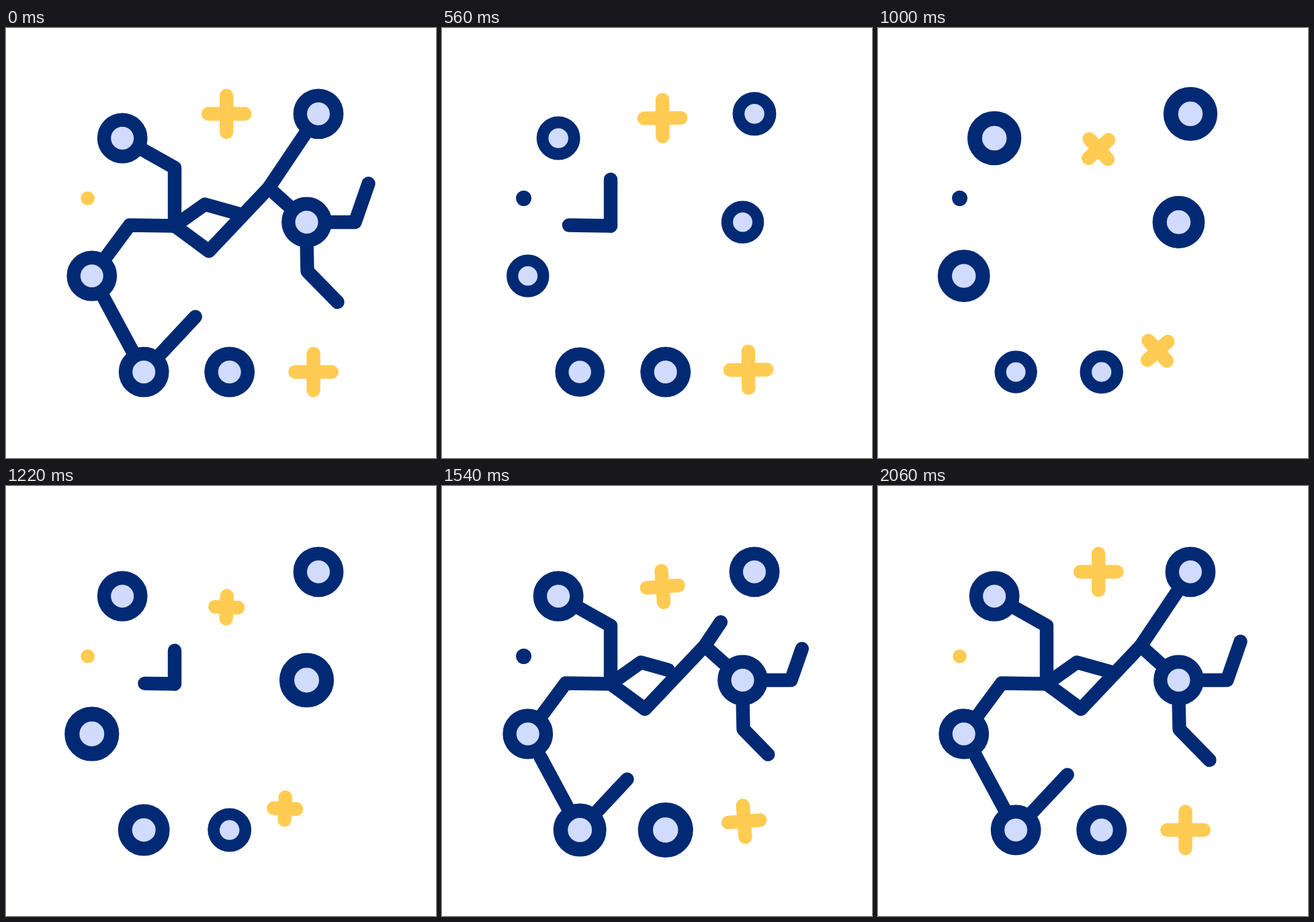
Write an HTML page that moves like this. It is 640 by 640 pixels and loops after 2400 ms.

```html
<!DOCTYPE html>
<html lang="en">
<head>
<meta charset="utf-8">
<title>Constellation</title>
<style>
  html, body { margin: 0; width: 100%; height: 100%; overflow: hidden; background: #fff; }
  svg { display: block; width: 100%; height: 100%; }
</style>
</head>
<body>
<svg id="stage" viewBox="0 0 640 640" fill="none" stroke-width="20.4" stroke-linecap="round" stroke-linejoin="round"></svg>
<script>
const LOOP = 2400;
const NAVY = '#022a74', PALE = '#d1dbfd', GOLD = '#ffcb52';
const stage = document.getElementById('stage');

function add(tag, attrs) {
  const el = document.createElementNS('http://www.w3.org/2000/svg', tag);
  for (const key in attrs) el.setAttribute(key, attrs[key]);
  return stage.appendChild(el);
}

const ramp = (t, from, to) => Math.min(1, Math.max(0, (t - from) / (to - from)));
const smooth = u => u * u * (3 - 2 * u);
const easeIn = u => u * u;
const easeOut = u => 1 - (1 - u) * (1 - u);

// Each line starts at its fixed end: path, retract from/to, grow from/to.
const lines = [
  ['M251 294.5V208L196.7 177.4', 17, 760, 1136, 1600],
  ['M251 294.5L184 293.5L144.2 347.2', 17, 760, 1136, 1600],
  ['M251 294.5L302 332L391 238L449.8 150.6', 20, 520, 1294, 1750],
  ['M251 294.5L296 262.5L348 277', 270, 530, 1296, 1660],
  ['M427.3 270.8L391 238', 155, 545, 1296, 1660],
  ['M474.7 289H519.5L539.5 231.5', 155, 545, 1296, 1660],
  ['M447.5 316.2L448.5 362L493.5 408', 155, 545, 1296, 1660],
  ['M192.1 488.1L140.9 393', 150, 470, 1296, 1660],
  ['M223.5 492.1L281.8 429.7', 150, 470, 1296, 1660]
].map(([d, ...times]) => ({ times, el: add('path', { d, pathLength: 1, stroke: NAVY }) }));

// x, y, then times of rest, smallest, largest, rest.
const stars = [
  [173.2, 164, 0, 440, 900, 1200],
  [465, 127.8, 0, 440, 900, 1200],
  [447.5, 289, 232, 672, 1140, 1480],
  [127.8, 369, 232, 672, 1140, 1480],
  [205.2, 512, 475, 915, 1375, 1730],
  [332.7, 512, 780, 1100, 1560, 1880]
].map(([x, y, ...times]) => ({
  x, y, times,
  el: add('circle', { r: 27.2, fill: PALE, stroke: NAVY })
}));

const sparkTop = add('path', { stroke: GOLD });
const sparkLow = add('path', { stroke: GOLD });
const dot = add('circle', { cx: 121.6, cy: 253.5 });

function drawLine({ el, times: [a, b, c, d] }, t) {
  const part = t < c ? 1 - easeIn(ramp(t, a, b)) : easeOut(ramp(t, c, d));
  el.setAttribute('visibility', part > 0.002 ? 'visible' : 'hidden');
  el.setAttribute('stroke-dasharray', part >= 1 ? 'none' : part + ' 2');
}

function drawStar({ el, x, y, times: [a, b, c, d] }, t) {
  const scale = 1 - 0.18 * smooth(ramp(t, a, b)) + 0.28 * smooth(ramp(t, b, c))
    - 0.1 * smooth(ramp(t, c, d));
  el.setAttribute('transform', `translate(${x} ${y}) scale(${scale})`);
}

function spin(t) {
  if (t < 505) return 0;
  if (t < 1540) return -((0.0131 * (t - 505)) ** 2);
  return -184 - 86 * (1 - (1 - ramp(t, 1540, 1870)) ** 1.4);
}

function drawSpark(el, x, y, arm, angle) {
  el.setAttribute('d', `M${-arm} 0H${arm}M0 ${-arm}V${arm}`);
  el.setAttribute('transform', `translate(${x} ${y}) rotate(${angle})`);
}

function draw(t) {
  lines.forEach(line => drawLine(line, t));
  stars.forEach(star => drawStar(star, t));

  const there = (a, b, c, d) => smooth(ramp(t, a, b)) - smooth(ramp(t, c, d));
  const arm = 27.2 - 10.2 * there(680, 1200, 1220, 1760);
  const angle = spin(t);
  const drop = there(430, 1040, 1190, 1820);
  drawSpark(sparkTop, 328.2, 127.8 + 53 * drop, arm, angle);

  // The lower spark follows a quadratic curve.
  const k = there(465, 1055, 1190, 1740);
  const curve = (mid, end) => 2 * k * (1 - k) * mid + k * k * end;
  drawSpark(sparkLow, 457.6 + curve(-10, -43), 512 + curve(-24, -32), arm, angle);

  const dark = (t >= 500 && t < 1020) || (t >= 1540 && t < 2060);
  dot.setAttribute('fill', dark ? NAVY : GOLD);
  dot.setAttribute('r', dark ? 11.5 : 10.3);
}

const start = performance.now();
function tick() {
  draw((performance.now() - start) % LOOP);
  requestAnimationFrame(tick);
}
tick();
</script>
</body>
</html>
```
